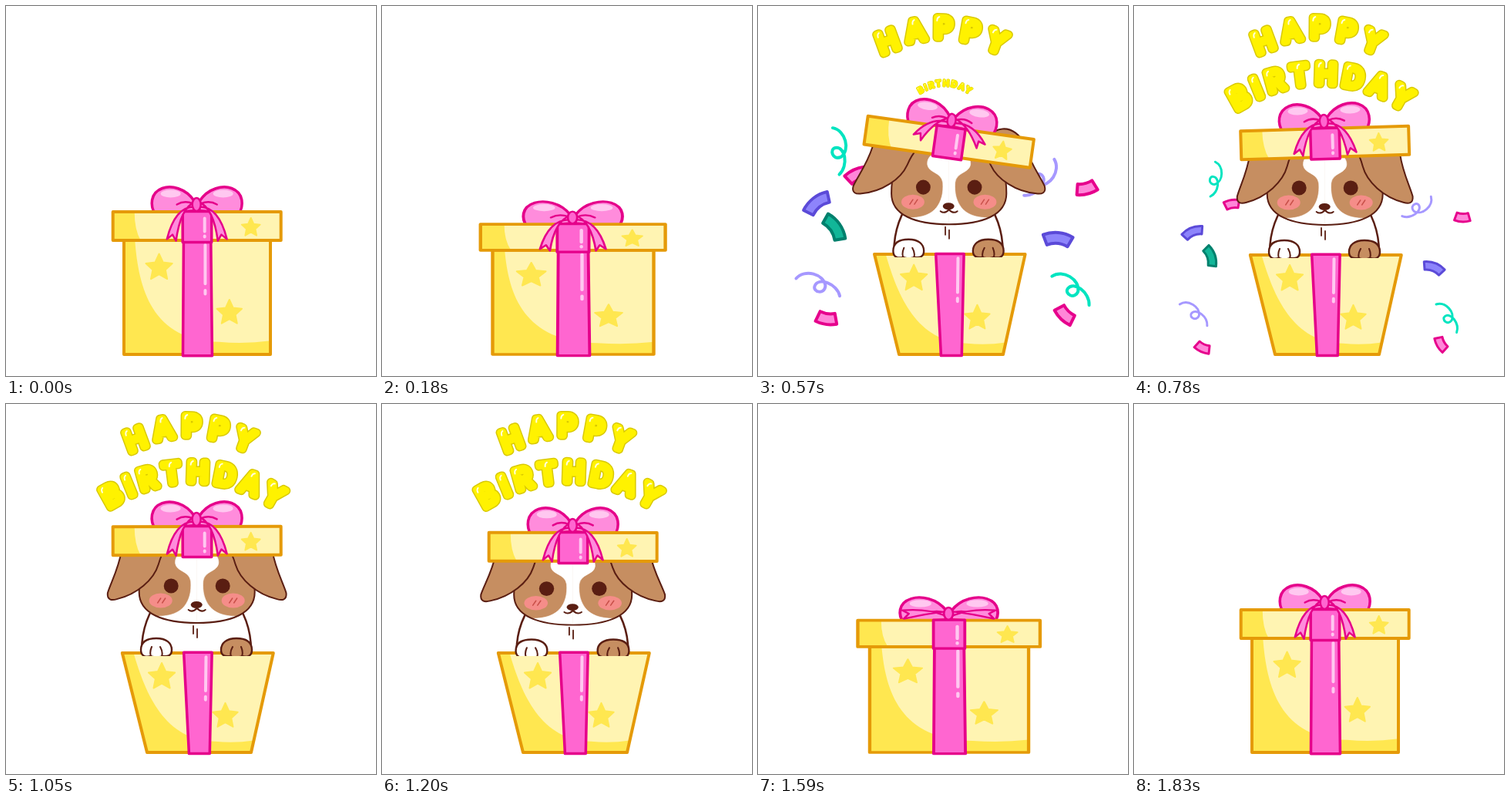
Animation of 480 by 480 pixels, one loop 2.28 s. Source, as an HTML page with a canvas:

```html
<!DOCTYPE html>
<html lang="en">
<head>
<meta charset="utf-8">
<title>Birthday surprise</title>
<style>
html, body { margin: 0; width: 100%; height: 100%; overflow: hidden; background: #fff; }
canvas { display: block; width: 480px; height: 480px; }
</style>
</head>
<body>
<canvas id="stage" width="480" height="480"></canvas>
<script>
const ctx = document.getElementById('stage').getContext('2d');
const LOOP = 2280, STEP = 30, TAU = Math.PI * 2, RAD = Math.PI / 180;
const GOLD = '#e59a08', PALE = '#fff4b2', SUN = '#ffe750';
const PINK = '#ff66d0', ROSE = '#ff8cdc', MAGENTA = '#e5008a', SHINE = '#ffc8f0';
const BROWN = '#c68e61', DARK = '#5a1e12', YELLOW = '#fff200';
const BAND = {
  pink: ['#e6008c', '#ff86d8'],
  purple: ['#5b4ad8', '#8d84fb'],
  teal: ['#00806d', '#12b698']
};
const CURL = { purple: '#a698ff', teal: '#00e4c0' };

// ---- timing ----
const mix = (a, b, s) => a + (b - a) * s;
const part = (t, a, b) => Math.min(1, Math.max(0, (t - a) / (b - a)));
const ease = (t, a, b) => { const s = part(t, a, b); return s * s * (3 - 2 * s); };
const bump = (t, a, peak, b) => ease(t, a, peak) - ease(t, peak, b);
const backIn = s => s * s * (1.9 * s - 0.9);
const pop = (t, start) => 1 - backIn(1 - part(t, start, start + 250)) - backIn(part(t, 1176, 1476));

function poseAt(t) {
  const out = ease(t, 180, 330) - part(t, 1380, 1560) ** 2;
  const jolt = t < 330 ? ease(t, 210, 330) : Math.exp((330 - t) / 70) * Math.cos((t - 330) / 240 * TAU);
  const lift = jolt - 0.2 * bump(t, 1110, 1200, 1290) + bump(t, 1230, 1350, 1470);
  const turn = 8 * Math.sin((t - 400) / 680 * TAU) * Math.exp(-(((t - 570) / 290) ** 2)) * out;
  return {
    out, jolt, lift, turn,
    rim: mix(304, 323, out) - 29 * jolt,
    lid: mix(285.5, 177.5 - 39.5 * lift, out),
    eyes: mix(400, 236 - 18 * lift - 9 * jolt, out),
    feet: mix(440, 328 - 5 * lift - 31 * jolt, out),
    sx: 1 - 0.1 * lift - 0.06 * jolt,
    sy: 1 + 0.1 * lift,
    ear: turn - 4 * lift,
    swing: 0.65 * bump(t, 180, 330, 900) + bump(t, 1400, 1600, 1830),
    squash: 0.2 * bump(t, 0, 120, 240) + 0.25 * bump(t, 1545, 1660, 1830)
  };
}

// ---- drawing helpers ----
function paint(path, fill, line, width) {
  if (fill) { ctx.fillStyle = fill; ctx.fill(path); }
  if (line) { ctx.strokeStyle = line; ctx.lineWidth = width; ctx.stroke(path); }
}
function shape(d, fill, line, width) { paint(new Path2D(d), fill, line, width); }
function oval(x, y, rx, ry, fill, line, width) {
  const p = new Path2D();
  p.ellipse(x, y, rx, ry, 0, 0, TAU);
  paint(p, fill, line, width);
}
function group(fn) { ctx.save(); fn(); ctx.restore(); }
function bothSides(fn) {
  for (const side of [-1, 1]) group(() => { ctx.scale(-side, 1); fn(side); });
}
function star(x, y, r) {
  const p = new Path2D();
  for (let i = 0; i < 10; i++) {
    const a = i * Math.PI / 5 - Math.PI / 2, q = i % 2 ? r * 0.48 : r;
    p.lineTo(x + q * Math.cos(a), y + q * Math.sin(a));
  }
  p.closePath();
  paint(p, SUN, SUN, 2);
}

// ---- gift box ----
function drawBox({ out, jolt, rim }) {
  const top = 95 + 3 * out - 6.5 * jolt, bottom = 95 - 27.5 * out;
  const at = (u, v) => [248 + out * (0.8 + 1.7 * v) + u * mix(top, bottom, v), mix(rim, 452, v)];
  const sag = v => v + (1 - v) * 0.11 * jolt;
  const poly = (...pts) => 'M' + pts.map(p => at(...p)).join('L') + 'Z';
  const outline = poly([-1, 0], [1, 0], [1, 1], [-1, 1]);
  shape(outline, SUN);
  shape(`M${at(-0.85, 0)}C${at(-0.8, 0.42)} ${at(-0.62, 0.88)} ${at(0.3, 0.89)}Q${at(0.65, 0.91)} ${at(1, 0.88)}L${at(1, 0)}Z`, PALE);
  star(...at(-0.52, sag(0.24)), 18);
  star(...at(0.44, sag(0.635)), 17);
  shape(outline, null, GOLD, 4);
  shape(poly([-0.185, -0.005], [0.187, -0.005], [0.205, 1.012], [-0.195, 1.012]), PINK, MAGENTA, 3.5);
  shape(`M${at(0.11, 0.04)}L${at(0.11, 0.38)}M${at(0.11, 0.44)}L${at(0.11, 0.47)}`, null, SHINE, 4);
}

function drawTail(swing) {
  const x = -33 - 22 * swing, y = 46 - 45 * swing, cx = -25, cy = 4 - 8 * swing;
  const a = Math.atan2(y - cy, x - cx);
  const nx = -Math.sin(a) * 6, ny = Math.cos(a) * 6;
  const bx = x - Math.cos(a) * 7, by = y - Math.sin(a) * 7;
  shape(`M-4,3Q${cx + nx * 0.6},${cy + ny * 0.6} ${x + nx},${y + ny}L${bx},${by}L${x - nx},${y - ny}Q${cx - nx * 0.6},${cy - ny * 0.6} -3,-3Z`, ROSE, MAGENTA, 2.5);
}

function drawLid({ lid, turn, jolt, swing }) {
  ctx.translate(247.7, lid);
  ctx.rotate(turn * RAD);
  ctx.scale(1 - 0.09 * jolt, 1 + 0.09 * jolt);
  bothSides(() => {
    shape('M-3,-32C-15,-50 -34,-53 -45,-49C-61,-43 -61,-26 -54,-15L-3,-20Z', ROSE, MAGENTA, 3.5);
    oval(-34, -42, 13, 5, SHINE);
    shape('M-5,-29Q-16,-34 -26,-28', null, MAGENTA, 2.5);
  });
  const edge = 'M-109,-18.5H109V18.5H-109Z';
  shape(edge, SUN);
  shape('M-81,-18.5Q-81,5 -73,18.5H109V-18.5Z', PALE);
  star(70, 2, 12.5);
  shape(edge, null, GOLD, 4);
  shape('M-18.5,-19H19V21H-18.5Z', PINK, MAGENTA, 3.5);
  shape('M10,-10V7M10,13V14', null, SHINE, 4);
  ctx.translate(0, -28);
  bothSides(() => drawTail(swing));
  oval(-0.5, 0, 5.5, 8.5, PINK, MAGENTA, 2.5);
}

// ---- puppy ----
const HEAD = new Path2D('M-58,-50C-70,-38 -75,-12 -75,8C-75,36 -44,48 0,48C44,48 75,36 75,8C75,-12 70,-38 58,-50Q0,-85 -58,-50Z');
const BLAZE = 'M0,-38C-10,-52 -30,-43 -28,-29C-26,-18 -10,-20 -8,-6C-7,8 -10,18 -16,26C-24,36 -38,41 -62,39V54H0Z';
const EAR = 'M-40,-50C-55,-80 -90,-80 -98,-45C-102,-22 -112,-4 -116,9C-117,18 -111,19 -104,17C-78,11 -56,-8 -50,-28Q-46,-42 -40,-50Z';

function clipRim(rim) {
  ctx.beginPath();
  ctx.rect(0, 0, 480, rim + 4);
  ctx.clip();
}
function drawDog({ rim, eyes, feet, sx, sy, ear }) {
  clipRim(rim);
  group(() => {
    ctx.translate(247, feet);
    ctx.scale(sx, sy);
    shape('M-45,-80C-60,-62 -71,-40 -71,-8V12H71V-8C71,-40 60,-62 45,-80Z', '#fff', DARK, 2.5);
    shape('M-69,-21Q-58,-26 -57,-16Q-60,-8 -69,-10Z', BROWN);
    shape('M-4,-40V-30M1,-36V-25', null, DARK, 1.8);
  });
  ctx.translate(247.7, eyes);
  ctx.scale(sx, sy);
  group(() => {
    paint(HEAD, BROWN);
    ctx.clip(HEAD);
    bothSides(() => shape(BLAZE, '#fff', '#fff', 0.6));
  });
  paint(HEAD, null, DARK, 2);
  bothSides(() => {
    oval(-47, 19, 15, 9.5, '#f58d89');
    oval(-33.5, 0, 9.5, 9.5, DARK);
    ctx.translate(-45, -60);
    ctx.rotate(ear * RAD);
    ctx.translate(45, 60);
    shape(EAR, BROWN, DARK, 2);
  });
  for (const x of [-47, 46]) shape(`M${x - 4},22l4,-6M${x + 2},22l4,-6`, null, '#c9504a', 1.5);
  oval(-0.5, 24.5, 7.5, 4.5, DARK);
  shape('M-11,31Q-6,35 0,29Q6,35 11,31', null, DARK, 2);
}
function drawPaws({ rim, feet, sx, sy }) {
  clipRim(rim);
  ctx.translate(247, feet);
  ctx.scale(sx, sy);
  bothSides(side => {
    shape('M-72,-9C-72,-20 -64,-24 -52,-24C-39,-24 -32,-18 -32,-9C-32,-1 -38,0 -44,-1Q-52,2 -59,-1C-66,1 -72,-1 -72,-9Z',
      side > 0 ? BROWN : '#fff', DARK, 2.4);
    shape('M-58,-13Q-61,-6 -59,-1M-47,-13Q-43,-6 -45,-1', null, DARK, 2);
  });
}

// ---- confetti: kind, colour, place and turn when the burst has spread ----
const BITS = [
  ['curl', 'teal', 106, 187, 80],
  ['curl', 'purple', 79, 360, 20],
  ['curl', 'purple', 369, 225, 128],
  ['curl', 'teal', 408, 365, 36],
  ['band', 'pink', 127, 219, -25],
  ['band', 'purple', 76, 255, -38],
  ['band', 'teal', 100, 287, 55],
  ['band', 'pink', 89, 406, 188],
  ['band', 'pink', 426, 237, 166],
  ['band', 'purple', 389, 301, 5],
  ['band', 'pink', 398, 401, 224]
];
function drawBand(color) {
  const [edge, fill] = BAND[color], r = 38, half = (color === 'pink' ? 12 : 17) / r;
  const p = new Path2D();
  p.arc(0, r, r + 7, -Math.PI / 2 - half, -Math.PI / 2 + half);
  p.arc(0, r, r - 7, -Math.PI / 2 + half, -Math.PI / 2 - half, true);
  p.closePath();
  paint(p, fill, edge, 4);
}
function drawCurl(color) {
  shape('M-30,4C-24,-12 2,-14 9,0C12,12 -4,13 -4,5C-4,-8 22,-8 31,6', null, CURL[color], 4);
}
function drawConfetti(t) {
  if (t < 225 || t > 960) return;
  const burst = part(t, 210, 330), glide = 1 - (1 - part(t, 330, 570)) ** 2, drop = part(t, 570, 960);
  const size = Math.min(1, 0.2 + burst) * (1 - ease(t, 690, 960));
  for (const [kind, color, x, y, turn] of BITS) group(() => {
    // Low pieces left the box first: already wide, with further to fall.
    const lead = (y - 187) / 220;
    const spread = mix(mix(0, 0.37 + 0.53 * lead, burst), 1, glide);
    const rise = mix(mix(270, y - 38 - 82 * lead, burst), y, glide);
    ctx.translate(mix(248, x, spread), rise + 70 * drop);
    ctx.rotate((turn + 25 * (glide - 1) + 30 * drop) * RAD);
    ctx.scale(size, size);
    (kind === 'curl' ? drawCurl : drawBand)(color);
  });
}

// ---- balloon lettering on an arc ----
function drawWord(word, x, y, crown, radius, span, lean, scale) {
  if (scale <= 0.01) return;
  ctx.translate(x, y);
  ctx.scale(scale, scale);
  ctx.font = '400 36px Inter, "Liberation Sans", sans-serif';
  ctx.textAlign = 'center';
  ctx.textBaseline = 'alphabetic';
  const letters = [...word], last = letters.length - 1;
  const widths = letters.map(c => ctx.measureText(c).width);
  const total = widths.reduce((a, b) => a + b);
  const gap = (span - total + (widths[0] + widths[last]) / 2) / last;
  let along = -span / 2 - widths[0] / 2;
  letters.forEach((c, i) => group(() => {
    const w = widths[i], a = (along + w / 2) / radius;
    along += w + gap;
    ctx.translate(radius * Math.sin(a), crown + radius * (1 - Math.cos(a)));
    ctx.rotate(a * lean);
    for (const [style, width] of [['#d9c900', 11.5], [YELLOW, 8.5]]) {
      ctx.strokeStyle = style;
      ctx.lineWidth = width;
      ctx.strokeText(c, 0, 13);
    }
    ctx.fillStyle = YELLOW;
    ctx.fillText(c, 0, 13);
    const hx = 'AIT'.includes(c) ? -2 : -w * 0.36;
    shape(`M${hx},-9Q${hx},-13 ${hx + 3},-14`, null, '#fffde0', 2);
  }));
}

function draw(t) {
  ctx.fillStyle = '#fff';
  ctx.fillRect(0, 0, 480, 480);
  ctx.lineJoin = ctx.lineCap = 'round';
  drawConfetti(t);
  const pose = poseAt(t), hasDog = pose.out > 0;
  group(() => {
    ctx.translate(248, 452);
    ctx.scale(1 + pose.squash, 1 - 0.87 * pose.squash);
    ctx.translate(-248, -452);
    if (hasDog) group(() => drawDog(pose));
    drawBox(pose);
    if (hasDog) group(() => drawPaws(pose));
    group(() => drawLid(pose));
  });
  group(() => drawWord('HAPPY', 239, 39, -11, 150, 148, 0.72, pop(t, 290)));
  group(() => drawWord('BIRTHDAY', 242, 105, -17, 197, 222, 0.9, pop(t, 549)));
}

const start = performance.now();
function frame() {
  const t = (performance.now() - start) % LOOP;
  draw(Math.floor(t / STEP) * STEP);
  requestAnimationFrame(frame);
}
frame();
</script>
</body>
</html>
```
